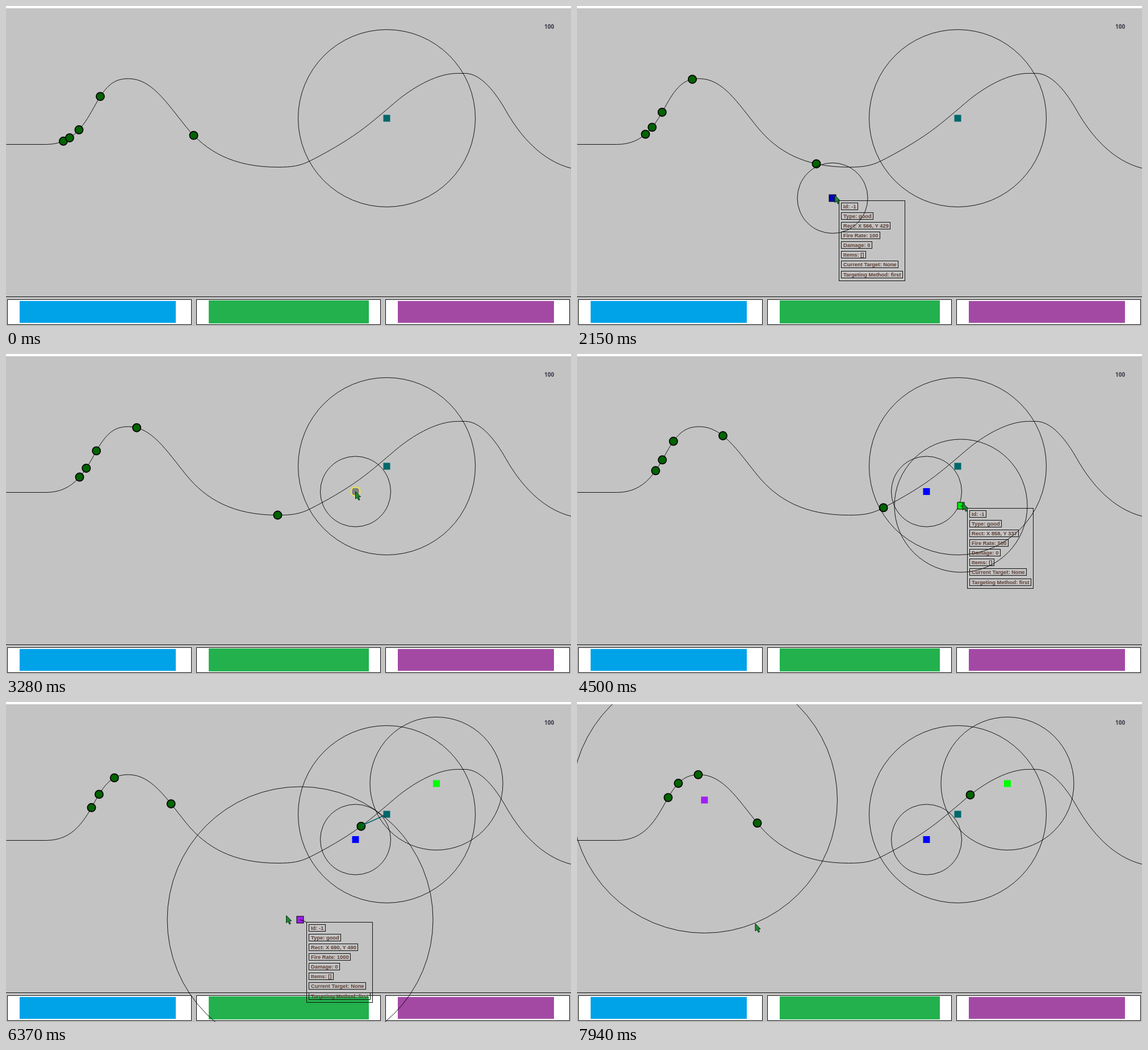
An HTML page for the animation above (7.99 s loop, 995 px wide and 563 px high).

```html
<!DOCTYPE html>
<html lang="en">
<head>
<meta charset="utf-8">
<title>Tower placement</title>
<style>
html, body { margin: 0; width: 100%; height: 100%; overflow: hidden; background: #fff; }
svg { display: block; width: 995px; height: 563px; }
.curve { fill: none; stroke: #000; stroke-width: 0.9; }
.edge { fill: none; stroke: #111; shape-rendering: crispEdges; }
.tip text { font: bold 9.4px "Liberation Sans", Arial, sans-serif; fill: #5f4036; }
.score { font: bold 10px "Open Sans", sans-serif; fill: #38384a; }
</style>
</head>
<body>
<svg id="stage" viewBox="0 0 995 563"></svg>
<script>
const LOOP = 7990, LAG = 51, SCALE = 1280 / 995;
const stage = document.getElementById('stage');

function set(node, attrs) {
  for (const k in attrs) node.setAttribute(k, attrs[k]);
}
function el(tag, attrs, parent = stage) {
  const node = document.createElementNS('http://www.w3.org/2000/svg', tag);
  set(node, attrs);
  return parent.appendChild(node);
}
const show = (node, on) => node.setAttribute('visibility', on ? 'visible' : 'hidden');
const move = (node, x, y) => node.setAttribute('transform', `translate(${x} ${y})`);
const square = (x, y, fill, parent) =>
  el('rect', { x: x - 6, y: y - 6, width: 12, height: 12, fill }, parent);

// Background and the road
el('rect', { y: 4, width: 995, height: 559, fill: '#c3c3c3' });
const road = el('path', {
  class: 'curve',
  transform: 'translate(.5 .5)',
  d: `M0 243H70C120 243 139 205 157.5 172S190 127.3 215 127.3
    C256 127.3 282 169.5 317 212.5S400 283 478 283
    C503 283 517 281 535 272C562 258.5 596 239 621 221
    C645 203.7 668 183 692 163C722 139.5 760 118 795 118H808
    C836 118 862 152 880 184C905 228 943 272 995 285`
});

// Build bar
el('path', { class: 'edge', d: 'M0 511.5H995' });
['#00a2e8', '#22b14c', '#a349a4'].forEach((fill, i) => {
  const x = 2.5 + 333 * i, grow = i === 1 ? 1 : 0;
  el('rect', { x, y: 516.5, width: 324, height: 44, class: 'edge', style: 'fill:#fff' });
  el('rect', { x: x + 21.5, y: 519 - grow, width: 275 + 7 * grow, height: 38.5 + 2 * grow, fill });
});
el('text', { x: 948, y: 40.3, class: 'score' }).textContent = '100';

// Road length at a given x, by bisection
function lengthAt(x) {
  let lo = 0, hi = road.getTotalLength();
  for (let i = 0; i < 20; i++) {
    const mid = (lo + hi) / 2;
    if (road.getPointAtLength(mid).x < x) lo = mid; else hi = mid;
  }
  return lo;
}

// Each enemy runs between two x positions; gain is its slight speed-up.
const enemies = [
  [100.5, 160, 0.12], [111.5, 178, 0.12], [128, 213, -0.1], [165.5, 317, 0.12], [330, 692, 0.08]
].map(([from, to, gain]) => ({
  start: lengthAt(from), end: lengthAt(to), gain,
  node: el('circle', { r: 7.1, fill: '#006400', stroke: '#000', 'stroke-width': 1.7 })
}));
function enemyAt({ start, end, gain }, t) {
  const u = t / 7940;
  return road.getPointAtLength(start + (end - start) * u * (1 - gain + gain * u));
}

const beam = el('path', { stroke: '#00686b', 'stroke-width': 1.6 });
el('circle', { class: 'curve', cx: 670.5, cy: 197.5, r: 156 });
square(670.5, 197.5, '#00686b');

const clip = el('clipPath', { id: 'field' }, el('defs', {}));
el('rect', { y: 4, width: 995, height: 559 }, clip);
const field = el('g', { 'clip-path': 'url(#field)' });

const towers = [
  { spot: [615.5, 242], r: 62, fill: '#0000ff', drag: '#0000c0', from: 1680, to: 3230, rate: 100 },
  { spot: [758, 143.5], r: 117, fill: '#00ff00', drag: '#00e810', from: 4080, to: 5200, rate: 500 },
  { spot: [224.5, 172.5], r: 234, fill: '#a020f0', drag: '#9a20e4', from: 5760, to: 7290, rate: 1000 }
];
for (const tower of towers) {
  tower.node = el('g', {}, field);
  el('circle', { class: 'curve', r: tower.r }, tower.node);
  tower.box = square(0, 0, tower.fill, tower.node);
  tower.ring = el('circle', { r: 8, fill: 'none', stroke: '#e8e83c', 'stroke-width': 2 }, tower.node);
}

// Pointer stops: fetch a tower from the bar, drag it, rest on its spot.
const [blue, green, purple] = towers.map(tower => tower.spot);
const stops = [
  [50, 656, 556], [880, 413, 522], [1640, 236, 530],
  [2048, 446, 344], [2150, 454, 333], [2449, 468, 318], [3130, ...blue], [3380, ...blue],
  [4030, 551, 531], [4398, 673, 272], [4500, 679, 262], [4958, 749, 149], [5150, ...green], [5300, ...green],
  [5760, 790, 528], [6268, 543, 391], [6370, 494, 376], [7200, ...purple], [7400, ...purple],
  [7940, 314, 390]
];
function pointer(t) {
  const i = Math.max(1, stops.findIndex(stop => stop[0] >= t));
  const [t0, x0, y0] = stops[i - 1], [t1, x1, y1] = stops[i];
  const u = (t - t0) / (t1 - t0);
  return [x0 + (x1 - x0) * u, y0 + (y1 - y0) * u];
}

// Info panel beside the dragged tower
const tip = el('g', { class: 'tip' });
el('path', { class: 'edge', d: 'M0 0L11.5 4.5' }, tip);
el('rect', { class: 'edge', x: 11.5, y: 4.5, width: 116, height: 141 }, tip);
const rows = Array.from({ length: 8 }, (_, i) => {
  const y = 8.5 + Math.floor(17.15 * i);
  return {
    frame: el('rect', { class: 'edge', x: 15.5, y, height: 12 }, tip),
    label: el('text', { x: 19, y: y + 9.2 }, tip)
  };
});
function fillTip(rate, [x, y]) {
  const lines = [
    'Id: -1', 'Type: good',
    `Rect: X ${Math.round(x * SCALE - 8)}, Y ${Math.round((y - 4) * SCALE - 8)}`,
    `Fire Rate: ${rate}`, 'Damage: 0', 'Items: []',
    'Current Target: None', 'Targeting Method: first'
  ];
  rows.forEach(({ frame, label }, i) => {
    if (label.textContent === lines[i]) return;
    label.textContent = lines[i];
    frame.setAttribute('width', Math.round(label.getComputedTextLength() + 6.5));
  });
}

const cursor = el('path', {
  d: 'M0 0V13L3 10.3L5.4 15.2L7.6 14.2L5.3 9.6L9 9.2Z',
  fill: '#1f8a34', stroke: '#062a0c'
});

function render(t) {
  for (const enemy of enemies) {
    const { x, y } = enemyAt(enemy, t);
    move(enemy.node, x + 0.5, y + 0.5);
  }
  const target = enemyAt(enemies[4], t);
  show(beam, t >= 6340 && t < 6440);
  beam.setAttribute('d', `M670.5 197.5L${target.x} ${target.y}`);

  let active = null;
  for (const tower of towers) {
    const dragged = t >= tower.from && t < tower.to;
    const flash = t >= tower.to && t < tower.to + 100;
    const [x, y] = dragged ? pointer(t - LAG).map(Math.round) : tower.spot;
    show(tower.node, t >= tower.from);
    tower.ring.setAttribute('stroke-opacity', flash ? 1 : 0);
    set(tower.box, {
      fill: flash ? '#808080' : dragged ? tower.drag : tower.fill,
      stroke: dragged ? '#000' : 'none'
    });
    move(tower.node, x, y);
    if (dragged) {
      active = tower;
      move(tip, x, y);
    }
  }
  show(tip, active);
  if (active) fillTip(active.rate, pointer(t - 2 * LAG));

  show(cursor, t >= 50);
  move(cursor, ...pointer(Math.min(t, 7940)));
}

const start = performance.now();
function tick() {
  render((performance.now() - start) % LOOP);
  requestAnimationFrame(tick);
}
tick();
</script>
</body>
</html>
```
